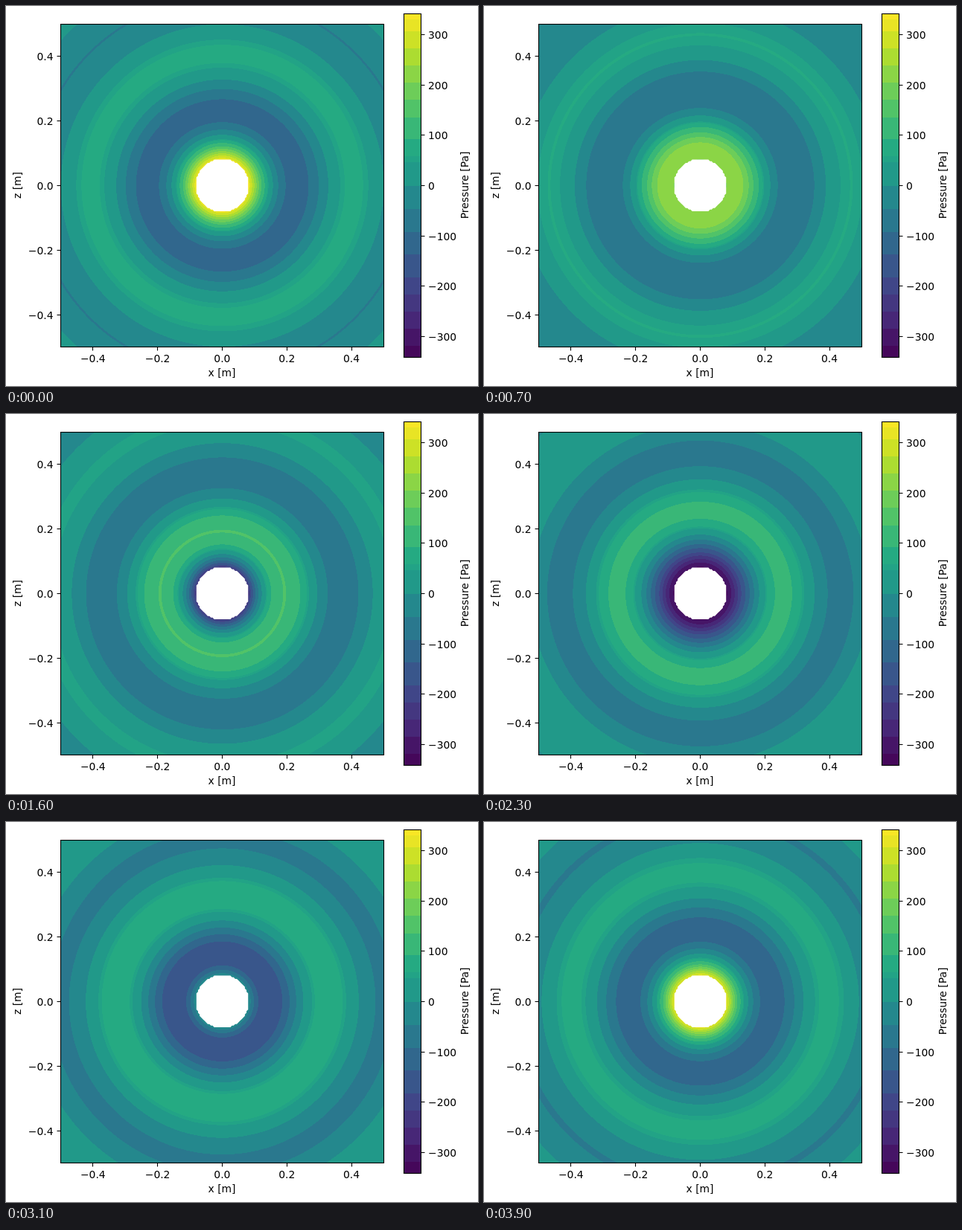
Write an HTML page with a canvas that moves like this. It is 634x511 px and loops after 4000 ms.

```html
<!DOCTYPE html>
<html lang="en">
<head>
<meta charset="utf-8">
<title>Pressure field</title>
<style>
html, body { margin: 0; width: 100%; height: 100%; overflow: hidden; background: #fff; }
canvas { display: block; }
</style>
</head>
<body>
<canvas id="stage" width="634" height="511"></canvas>
<script>
const ctx = document.getElementById('stage').getContext('2d');
const plot = { x: 73, y: 24, size: 434 };
const bar = { x: 534, y: 10, w: 23, h: 462 };
const center = { x: 290.5, y: 241.3 };

const STEP_MS = 100, STEPS = 40;
const WAVELENGTH = 0.343, CREST = 0.414, SOURCE_RADIUS = 0.08;
const PEAK = 341.3, UNIT = PEAK / 30;
const LEVELS = [-30, -28, -25, -22, -19, -16, -12, -8.1, -4.11, 0,
  4.1, 5.08, 8.1, 11.92, 15, 18, 21, 24, 27, 29, 30];
const VIRIDIS = ['440154', '482475', '414487', '355f8d', '2a788e', '21918c',
  '22a884', '44bf70', '7ad151', 'bddf26', 'fde725']
  .map(hex => [0, 2, 4].map(i => parseInt(hex.slice(i, i + 2), 16)));

function viridis(v) {
  const pos = v * 10, i = Math.min(9, Math.floor(pos)), f = pos - i;
  return VIRIDIS[i].map((c, n) => Math.round(c + (VIRIDIS[i + 1][n] - c) * f));
}

const bandColors = LEVELS.slice(1).map((top, i) => viridis(0.5 + (top + LEVELS[i]) / 120));
const packed = bandColors.map(([r, g, b]) => (255 << 24 | b << 16 | g << 8 | r) >>> 0);

function bandOf(pressure) {
  const v = pressure / UNIT;
  let i = 0;
  while (i < LEVELS.length - 2 && v >= LEVELS[i + 1]) i++;
  return i;
}

// Radius of every pixel, in quarter pixels
const FINE = 4;
const field = ctx.createImageData(plot.size, plot.size);
const pixels = new Uint32Array(field.data.buffer);
const radii = new Uint16Array(pixels.length);
for (let i = 0; i < radii.length; i++) {
  const x = plot.x + i % plot.size + 0.5 - center.x;
  const y = plot.y + Math.floor(i / plot.size) + 0.5 - center.y;
  radii[i] = Math.round(Math.hypot(x, y) * FINE);
}
const colorAt = new Uint32Array(Math.ceil(plot.size * 0.75 * FINE));

function drawField(step) {
  const k = 2 * Math.PI / WAVELENGTH;
  const crest = CREST + WAVELENGTH * step / STEPS;
  for (let i = 0; i < colorAt.length; i++) {
    const r = Math.max(SOURCE_RADIUS * 0.98, i / FINE / plot.size);
    const pressure = PEAK * SOURCE_RADIUS / r * Math.cos(k * (r - crest));
    colorAt[i] = packed[bandOf(pressure)];
  }
  for (let i = 0; i < pixels.length; i++) pixels[i] = colorAt[radii[i]];
  ctx.putImageData(field, plot.x, plot.y);
}

// Cells of a 200 x 200 grid that touch the masked source
const hole = new Path2D();
const CELL = plot.size / 200, REACH = 16;
function addPolygon(points) {
  points.forEach(([i, j], n) => {
    const x = center.x + i * CELL, y = center.y + j * CELL;
    n ? hole.lineTo(x, y) : hole.moveTo(x, y);
  });
  hole.closePath();
}
for (let i = -REACH; i < REACH; i++) {
  for (let j = -REACH; j < REACH; j++) {
    const corners = [[i, j], [i + 1, j], [i + 1, j + 1], [i, j + 1]];
    const masked = corners.map(([a, b]) => a * a + b * b < REACH * REACH);
    const count = masked.filter(Boolean).length;
    if (count > 1) addPolygon(corners);
    else if (count === 1) {
      const n = masked.indexOf(true);
      addPolygon([corners[(n + 3) % 4], corners[n], corners[(n + 1) % 4]]);
    }
  }
}

function line(x1, y1, x2, y2) {
  ctx.beginPath();
  ctx.moveTo(x1, y1);
  ctx.lineTo(x2, y2);
  ctx.stroke();
}

function label(text, x, y, align, turned) {
  ctx.save();
  ctx.translate(x, y);
  if (turned) ctx.rotate(-Math.PI / 2);
  ctx.textAlign = align;
  ctx.fillText(text, 0, 0);
  ctx.restore();
}

const signed = text => text.replace('-', '\u2212');
const crisp = v => Math.floor(v) + 0.5;

function drawBar() {
  const yOf = v => bar.y + bar.h * (0.5 - v / 60) + 0.5;
  bandColors.forEach((color, i) => {
    const top = Math.round(yOf(LEVELS[i + 1])), bottom = Math.round(yOf(LEVELS[i]));
    ctx.fillStyle = `rgb(${color})`;
    ctx.fillRect(bar.x, top, bar.w, bottom - top);
  });
  ctx.fillStyle = '#000';
  ctx.strokeRect(bar.x + 0.5, bar.y + 0.5, bar.w, bar.h);
  for (let p = -300; p <= 300; p += 100) {
    const y = crisp(yOf(p / UNIT));
    line(bar.x + bar.w + 1, y, bar.x + bar.w + 5.5, y);
    label(signed(String(p)), 567, y + 5, 'left');
  }
  label('Pressure [Pa]', 620.5, 241, 'center', true);
}

function drawAxes() {
  const edge = plot.y + plot.size;
  ctx.strokeRect(plot.x + 0.5, plot.y + 0.5, plot.size, plot.size);
  for (let n = -2; n <= 2; n++) {
    const offset = n * plot.size / 5;
    const x = crisp(290.4 + offset), y = crisp(241.4 - offset);
    const text = signed((n / 5).toFixed(1));
    line(x, edge + 1, x, edge + 5.5);
    line(plot.x, y, plot.x - 4.5, y);
    label(text, 290.4 + offset, 479, 'center');
    label(text, 63.5, y + 5, 'right');
  }
  label('x [m]', 290, 498, 'center');
  label('z [m]', 20, 241, 'center', true);
}

function draw(step) {
  ctx.fillStyle = '#fff';
  ctx.fillRect(0, 0, 634, 511);
  drawField(step);
  ctx.fillStyle = '#fff';
  ctx.fill(hole);
  ctx.strokeStyle = '#000';
  ctx.lineWidth = 1.1;
  ctx.font = '13.89px "DejaVu Sans", sans-serif';
  drawBar();
  drawAxes();
}

const start = performance.now();
let shown = -1;
function tick() {
  const step = Math.floor((performance.now() - start) / STEP_MS) % STEPS;
  if (step !== shown) draw(shown = step);
  requestAnimationFrame(tick);
}
tick();
</script>
</body>
</html>
```
